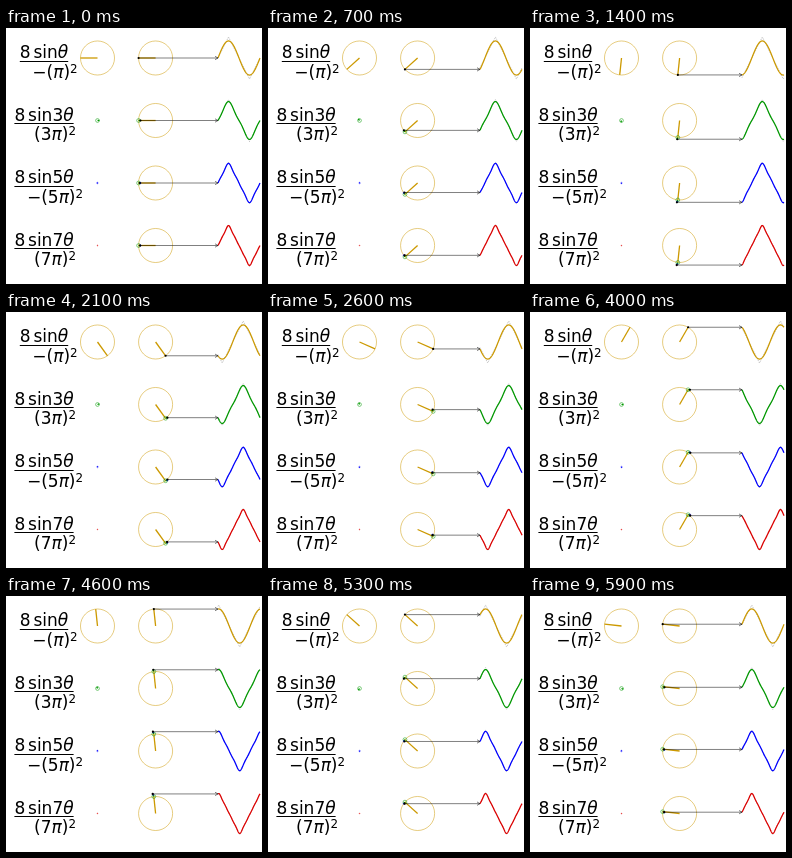
An HTML page with a canvas for the animation above (6000 ms loop, 256x256 px).

```html
<!DOCTYPE html>
<html lang="en">
<head>
<meta charset="utf-8">
<title>Triangle wave from rotating vectors</title>
<style>
html, body { margin: 0; width: 100%; height: 100%; overflow: hidden; background: #fff; }
canvas { display: block; }
</style>
</head>
<body>
<canvas id="stage" width="256" height="256"></canvas>
<script>
const ctx = document.getElementById('stage').getContext('2d');
const TAU = 2 * Math.PI;
const LOOP = 6000, STEP = 100;
const UNIT = 21;                          // pixels per unit of amplitude
const WAVE_X = 212, PERIOD = 2 * UNIT;
const FONT_SIZE = 17;
const terms = [
  { n: 1, sign: -1, color: '#cc9900', top: '8 sinθ', bottom: '−(π)^' },
  { n: 3, sign: 1, color: '#009900', top: '8 sin3θ', bottom: '(3π)^' },
  { n: 5, sign: -1, color: '#0000ff', top: '8 sin5θ', bottom: '−(5π)^' },
  { n: 7, sign: 1, color: '#dd0000', top: '8 sin7θ', bottom: '(7π)^' }
];
for (const term of terms) term.radius = 8 / (term.n * Math.PI) ** 2 * UNIT;

function line(points, color, width) {
  ctx.beginPath();
  for (const [x, y] of points) ctx.lineTo(x, y);
  ctx.strokeStyle = color;
  ctx.lineWidth = width;
  ctx.stroke();
}

// Greek is italic, a space is thin and ^ stands for a raised 2.
function glyph(c) {
  const raised = c === '^';
  const size = raised ? FONT_SIZE * 0.7 : FONT_SIZE;
  const style = /[θπ]/.test(c) ? 'italic ' : '';
  const font = `${style}${size}px "DejaVu Sans", sans-serif`;
  const text = raised ? '2' : c;
  ctx.font = font;
  const width = c === ' ' ? FONT_SIZE / 6 : ctx.measureText(text).width;
  return { text, font, width, rise: raised ? 5 : 0 };
}

// Draws centred text and returns its width.
function label(text, center, baseline) {
  const glyphs = [...text].map(glyph);
  const total = glyphs.reduce((sum, g) => sum + g.width, 0);
  let x = center - total / 2;
  ctx.fillStyle = '#000';
  for (const g of glyphs) {
    ctx.font = g.font;
    ctx.fillText(g.text, x, baseline - g.rise);
    x += g.width;
  }
  return total;
}

// Draws one rotating vector with its circle and returns its tip.
function vector({ n, sign, radius, color }, [x, y], theta) {
  const tip = [
    x + sign * radius * Math.cos(n * theta),
    y - sign * radius * Math.sin(n * theta)
  ];
  ctx.beginPath();
  ctx.arc(x, y, radius, 0, TAU);
  ctx.strokeStyle = color;
  ctx.lineWidth = 0.5;
  ctx.stroke();
  line([[x, y], tip], color, 1.3);
  return tip;
}

function wave(y, height, theta) {
  const points = [];
  for (let x = 0; x <= PERIOD; x += 0.25) {
    points.push([WAVE_X + x, y - UNIT * height(theta - x / PERIOD * TAU)]);
  }
  return points;
}

const triangle = a => -2 / Math.PI * Math.asin(Math.sin(a));
const partialSum = count => a => terms.slice(0, count)
  .reduce((sum, t) => sum + t.sign * t.radius / UNIT * Math.sin(t.n * a), 0);

function row(index, theta) {
  const term = terms[index], y = 30 + 62.5 * index;

  const width = label(term.top, 38, y);
  ctx.fillRect(38 - width / 2, Math.round(y + 2.5), width, 1);
  label(term.bottom, 49, y + 19.5);

  vector(term, [91.5, y], theta);
  let tip = [149.6, y];
  for (const t of terms.slice(0, index + 1)) tip = vector(t, tip, theta);

  ctx.setLineDash([1, 1]);
  line(wave(y, triangle, theta), '#888', 0.6);
  ctx.setLineDash([]);
  line(wave(y, partialSum(index + 1), theta), term.color, 1.25);

  const end = tip[1];
  line([tip, [WAVE_X, end]], '#000', 0.5);
  line([[WAVE_X - 3, end - 1.7], [WAVE_X, end], [WAVE_X - 3, end + 1.7]], '#000', 0.5);
  ctx.beginPath();
  ctx.arc(...tip, 1.1, 0, TAU);
  ctx.fillStyle = '#000';
  ctx.fill();
}

function draw() {
  const time = Math.floor(performance.now() % LOOP / STEP) * STEP;
  ctx.fillStyle = '#fff';
  ctx.fillRect(0, 0, 256, 256);
  terms.forEach((_, index) => row(index, time / LOOP * TAU));
  requestAnimationFrame(draw);
}
draw();
</script>
</body>
</html>
```
